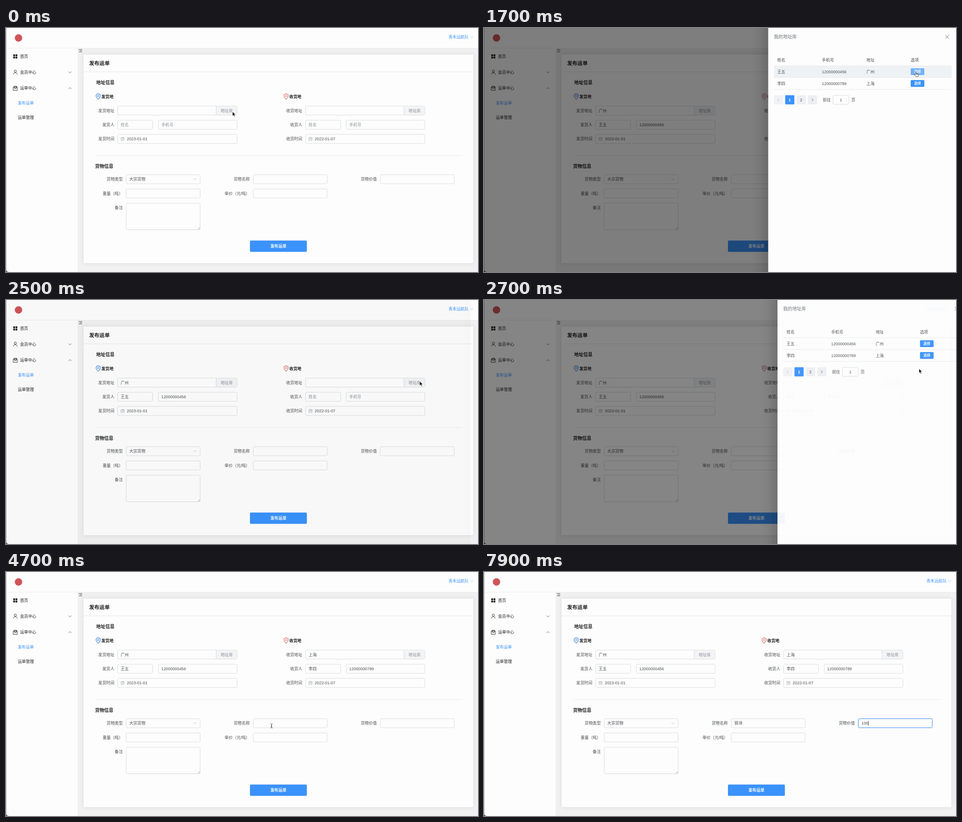
Animation, 1039 px wide and 539 px high, one loop 8 s. Source, as an HTML page:

```html
<!DOCTYPE html>
<html lang="zh-CN">
<head>
<meta charset="utf-8">
<title>发布运单</title>
<style>
  html, body { margin: 0; width: 100%; height: 100%; overflow: hidden; background: #fdfdfd; }
  svg { display: block; width: 100%; height: 100%; }
  text { font-family: "Liberation Sans", "Noto Sans CJK SC", "Noto Sans CJK", sans-serif; white-space: pre; }
</style>
</head>
<body>
<svg id="stage" viewBox="0 0 1039 539" xmlns="http://www.w3.org/2000/svg"></svg>
<script>
const LOOP = 8000;
const BLUE = '#3a92fa', INK = '#4c4e52', DARK = '#1f2022', HINT = '#8d9096', LINE = '#d6d8dd';
const PHONE_A = '12000000456', PHONE_B = '12000000789';
const COL = 279.7, SIDE = 413.6;

// Drawing helpers; text is placed by its vertical centre.
const text = (x, y, s, { size = 8.87, fill = INK, bold, anchor = 'start', id = '' } = {}) =>
  `<text ${id && `id="${id}"`} x="${x}" y="${y + size * .37}" font-size="${size}" fill="${fill}"
    font-weight="${bold ? 700 : 400}" text-anchor="${anchor}">${s}</text>`;
const rect = (x, y, w, h, fill, extra = '') =>
  `<rect x="${x}" y="${y}" width="${w}" height="${h}" fill="${fill}" ${extra}/>`;
const path = (d, stroke, width = .9, fill = 'none') =>
  `<path d="${d}" stroke="${stroke}" stroke-width="${width}" fill="${fill}" stroke-linejoin="round" stroke-linecap="round"/>`;
const field = (x, y, w, h = 20) => rect(x, y - 10, w, h, '#fdfdfd', `rx="2.4" stroke="${LINE}" stroke-width=".9"`);
const chevron = (x, y, dir, color) => path(`M${x - 3} ${y - 1.5 * dir}l3 ${3 * dir} 3 ${-3 * dir}`, color, .8);
const label = (x, y, s) => text(x, y, s, { anchor: 'end' });
const group = (id, body, extra = '') => `<g id="${id}" ${extra}>${body}</g>`;

function sidebar() {
  const squares = [0, 1, 2, 3].map(i => rect(16 + i % 2 * 5, 58.3 + (i >> 1) * 5, 4, 4, DARK, 'rx=".5"')).join('');
  const item = (y, s) => text(31, y, s, { fill: DARK });
  return squares + item(62.5, '首页') + item(98, '会员中心') + item(133, '运单中心') +
    `<circle cx="20.5" cy="95.3" r="2.4" fill="none" stroke="${DARK}" stroke-width=".9"/>` +
    path('M16.4 102.2c.2-5 8-5 8.2 0', DARK) +
    path('M16.3 131h8.6v6.6h-8.6zM16.3 131l1.6-2.4h5.4l1.6 2.4M18.7 128.6v5h3.8v-5', DARK) +
    chevron(141, 98, 1, '#444') + chevron(141, 133, -1, '#444') +
    text(26, 166, '发布运单', { fill: BLUE }) + text(26, 197.5, '运单管理', { fill: DARK });
}

function address(dx, kind, color, date) {
  const x = 245.8 + dx, end = 238.5 + dx;
  const pin = path(`M${203 + dx} 157.4c-2.6-2.7-4.8-4.9-4.8-7.5a4.8 4.8 0 0 1 9.6 0c0 2.6-2.2 4.8-4.8 7.5z`, color, 1.1) +
    `<circle cx="${203 + dx}" cy="150" r="1.9" fill="none" stroke="${color}"/>`;
  const calendar = path(`M${x + 7.7} 242.2h6.6v6.4h-6.6zm0 2.2h6.6m-4.8-3.2v1.6m3-1.6v1.6m-3.2 3.2h3.6`, '#a3a6ad', .7);
  return pin + text(210 + dx, 151.3, kind + '地', { fill: DARK, bold: true }) +
    label(end, 182.5, kind + '地址') + label(end, 213.8, kind + '人') + label(end, 245, kind + '时间') +
    field(x, 182.4, 262.8) + rect(x + 217, 172.8, 45.4, 19.2, '#f2f4f6') +
    path(`M${x + 216.8} 172.4v20`, LINE) + text(472.5 + dx, 182.5, '地址库', { fill: HINT }) +
    field(x, 213.8, 77) + field(x + 89.5, 213.8, 173.3) + field(x, 245.1, 262.8) + calendar +
    text(x + 20.2, 245.1, date);
}

const hints = dx => text(252.5 + dx, 213.8, '姓名', { fill: HINT }) + text(342 + dx, 213.8, '手机号', { fill: HINT });
const filled = (dx, city, name, phone) =>
  text(252.5 + dx, 182.5, city) + text(252.5 + dx, 213.8, name) + text(342 + dx, 213.8, phone);

function cargo() {
  const cell = (i, y, s) => label(257 + COL * i, y, s) + field(264.6 + COL * i, y, 162.8);
  return text(196, 305, '货物信息', { size: 10.1, fill: DARK, bold: true }) +
    cell(0, 334, '货物类型') + cell(1, 334, '货物名称') + cell(2, 334, '货物价值') +
    cell(0, 365.4, '重量（吨）') + cell(1, 365.4, '单价（元/吨）') +
    text(271.3, 334.2, '大宗货物') + chevron(416, 334, 1, '#a8abb2') +
    label(257, 397, '备注') + field(264.6, 397, 162.8, 58.6) +
    path('M422.5 444.5l4-4m-1.6 4l1.6-1.6', '#777', .6);
}

function page() {
  return rect(0, 0, 1039, 539, '#fdfdfd') + rect(157.5, 44.5, 882, 495, '#f1f1f1') +
    rect(0, 44, 1039, .8, '#e9e9e9') +
    `<circle cx="27.5" cy="22" r="8.2" fill="#cf5558"/>` +
    text(974, 20, '青禾远航队', { fill: BLUE }) + chevron(1025, 20, 1, '#8fb4dd') +
    sidebar() + path('M160.5 47.4h6.8m-5 2.7h5m-6.8 2.7h6.8', '#444', .9) +
    rect(170, 58, 859.4, 462, '#fdfdfd', 'rx="2" stroke="#dfe1e5" stroke-width=".9" style="filter:drop-shadow(0 0 4px #0001)"') +
    text(183, 77.5, '发布运单', { size: 11.3, fill: DARK, bold: true }) + rect(170, 96.4, 859.4, .9, '#e2e4e8') +
    text(198.5, 120, '地址信息', { size: 10.1, fill: DARK, bold: true }) +
    address(0, '发货', '#2f83dc', '2023-01-01') + address(SIDE, '收货', '#dd6565', '2022-01-07') +
    group('hintA', hints(0)) + group('hintB', hints(SIDE)) +
    group('fillA', filled(0, '广州', '王五', PHONE_A)) + group('fillB', filled(SIDE, '上海', '李四', PHONE_B)) +
    rect(196, 281.3, 808, .8, '#e3e5e9') + cargo() +
    rect(537, 469.6, 125.3, 25, BLUE, 'rx="2.4"') +
    text(599.7, 482, '发布运单', { fill: '#fff', bold: true, anchor: 'middle' }) +
    [1, 2].map(i => rect(264.6 + COL * i, 324, 162.8, 20, 'none', `id="focus${i}" rx="2.4" stroke="${BLUE}" stroke-width="1"`)).join('') +
    text(551.3, 334.2, '', { id: 'goods' }) + text(831, 334.2, '', { id: 'price' }) +
    rect(0, 341, 0, .7, INK, 'id="compose"') + rect(0, 329, .8, 10.5, '#222', 'id="caret"') +
    rect(0, 0, .9, 539, '#a2a2a2') + '<path d="M0 532v7h7q-7 0-7-7z" fill="#555"/>';
}

function drawer() {
  const cols = [645.5, 743.8, 841.8, 939.3];
  const row = (y, cells) => cells.map((s, i) => text(cols[i], y, s)).join('');
  const pick = (i, y) => rect(939.3, y - 7.6, 30, 15, BLUE, `id="pick${i}" rx="1.8"`) +
    text(954.3, y, '选择', { size: 7.6, fill: '#fff', bold: true, anchor: 'middle' });
  const pager = (x, fill) => rect(x, 148.6, 20.2, 20.2, fill, 'rx="1.4"');
  return rect(589, 0, 37, 539, 'url(#shade)') + rect(625.6, 0, 414, 539, '#fdfdfd') +
    text(638, 19.6, '我的地址库', { size: 10.1, fill: '#6f7379' }) +
    path('M1016 16l7.2 7.2m0-7.2l-7.2 7.2', '#555', .9) +
    rect(638, 84, 391.4, 26, '#eff2f5', 'id="row1"') + rect(638, 110, 391.4, 26, '#eff2f5', 'id="row2"') +
    [83.3, 109.3, 135.3].map(y => rect(638, y, 391.4, .8, '#e4e7ec')).join('') +
    row(71, ['姓名', '手机号', '地址', '选项']) +
    row(96.8, ['王五', PHONE_A, '广州']) + row(122.5, ['李四', PHONE_B, '上海']) +
    pick(1, 96.6) + pick(2, 122.6) +
    pager(638, '#f0f2f5') + pager(663, BLUE) + pager(688, '#eeeff2') + pager(713, '#eeeff2') +
    path('M649.2 156l-2.6 2.7 2.6 2.7', '#b4b7bd') + path('M721.8 156l2.6 2.7-2.6 2.7', '#555') +
    text(673, 158.7, '1', { fill: '#fff', bold: true, anchor: 'middle' }) + text(698, 158.7, '2', { anchor: 'middle' }) +
    text(745.7, 158.7, '前往') + field(768.4, 158.7, 34.8) +
    text(785.8, 158.7, '1', { anchor: 'middle' }) + text(808.5, 158.7, '页');
}

const pointers = group('arrow', path('M0 0v9.4l2.2-2 1.5 3.5 1.7-.7-1.5-3.4h3z', '#fff', .7, '#111')) +
  group('hand', path('M-1 .5c0-1.5 2-1.5 2 0v3.2l3.4.7c1.3.3 1.8 1 1.6 2.2l-.7 3.6H.2l-3.4-4c-.6-1 .6-1.7 1.4-.9l.8.8zM1.2 3.7v1.7M2.8 4.1v1.5M4.4 4.5v1.3', '#222', .8, '#fff')) +
  group('beam', path('M-2-4.4q1.6 0 2 .9q.4-.9 2-.9M0-3.5v7M-2 4.4q1.6 0 2-.9q.4.9 2 .9M-1 .9h2', '#222', .9));

document.getElementById('stage').innerHTML =
  `<defs><linearGradient id="shade"><stop stop-opacity="0"/><stop offset=".5" stop-opacity=".05"/>
    <stop offset="1" stop-opacity=".16"/></linearGradient></defs>` + page() +
  group('mask', rect(0, 0, 1039, 539, '#000', 'opacity=".5"') + group('drawer', drawer())) + group('pointer', pointers);

const el = id => document.getElementById(id);
const show = (id, on) => el(id).setAttribute('opacity', +on);
const clamp = v => Math.min(1, Math.max(0, v));

// cubic-bezier(.25, .1, .25, 1)
function ease(x) {
  let a = 0, b = 1;
  const bez = (u, p, q) => 3 * u * (1 - u) ** 2 * p + 3 * u * u * (1 - u) * q + u ** 3;
  for (let i = 0; i < 20; i++) {
    const m = (a + b) / 2;
    bez(m, .25, .25) < x ? a = m : b = m;
  }
  return bez(a, .1, 1);
}
const ramp = (t, start, ms = 300) => ease(clamp((t - start) / ms));

const MOVES = [
  [0, 498.5, 185], [250, 498.5, 185], [1300, 950.5, 97], [1700, 950.5, 97], [1900, 936, 147],
  [2260, 905, 183], [2450, 905, 183], [2700, 957.5, 152], [3250, 966, 120], [4420, 966, 120],
  [4690, 584.5, 340], [5950, 584.5, 340], [6700, 860, 334], [LOOP, 860, 334]
];
function pointerAt(t) {
  const i = MOVES.findIndex(m => m[0] > t);
  const [t0, x0, y0] = MOVES[i - 1], [t1, x1, y1] = MOVES[i];
  const k = (t - t0) / (t1 - t0), s = k * k * (3 - 2 * k);
  return [x0 + (x1 - x0) * s, y0 + (y1 - y0) * s];
}

const latest = (steps, t) => steps.reduce((s, [at, v]) => t >= at ? v : s, '');
const GOODS = [[5100, 't'], [5200, 'ti'], [5300, 'tie'], [5400, 'tie k'], [5500, 'tie ku'], [5600, 'tie kuai'], [5900, '铁块']];
const PRICE = [[7400, '1'], [7800, '10'], [7900, '100']];

function render(t) {
  const open = t < 2400 ? ramp(t, 60) - ramp(t, 1714) : ramp(t, 2484) - ramp(t, 3916);
  show('mask', 0);
  el('mask').setAttribute('opacity', open);
  el('drawer').setAttribute('transform', `translate(${413.5 * (1 - open)} 0)`);

  const [x, y] = pointerAt(t);
  const overDrawer = open > 0 && x > 638;
  const row = overDrawer && y > 84 && y < 136 ? (y < 110 ? 1 : 2) : 0;
  const onPick = row && x > 939 && x < 970 && Math.abs(y - (row === 1 ? 96.6 : 122.6)) < 8;
  for (const i of [1, 2]) {
    show('row' + i, row === i);
    el('pick' + i).setAttribute('fill', onPick && row === i && open > .98 ? '#72b2fb' : BLUE);
  }
  const inField = y > 324 && y < 344 && (x > 544 && x < 708 || x > 824 && x < 987);
  const hidden = t >= 5100 && t < 5950 || t >= 7400;
  const kind = inField ? 'beam' : onPick ? 'hand' : 'arrow';
  for (const id of ['arrow', 'hand', 'beam']) show(id, !hidden && id === kind);
  el('pointer').setAttribute('transform', `translate(${x} ${y})`);

  const fillA = t >= 1695, fillB = t >= 3910;
  show('fillA', fillA); show('hintA', !fillA);
  show('fillB', fillB); show('hintB', !fillB);

  show('focus1', ramp(t, 4800, 200) - ramp(t, 6850, 200));
  show('focus2', ramp(t, 6850, 200));
  const goods = latest(GOODS, t), price = latest(PRICE, t);
  el('goods').textContent = goods;
  el('price').textContent = price;
  const second = t >= 6850, active = el(second ? 'price' : 'goods');
  const width = (second ? price : goods) ? active.getComputedTextLength() : 0;
  show('caret', t >= 4850);
  el('caret').setAttribute('x', (second ? 831 : 551.3) + width);
  const composing = t >= 5100 && t < 5900;
  show('compose', composing);
  el('compose').setAttribute('x', 551.3);
  el('compose').setAttribute('width', composing ? width : 0);
}

const begin = performance.now();
function tick() {
  render((performance.now() - begin) % LOOP);
  requestAnimationFrame(tick);
}
tick();
</script>
</body>
</html>
```
